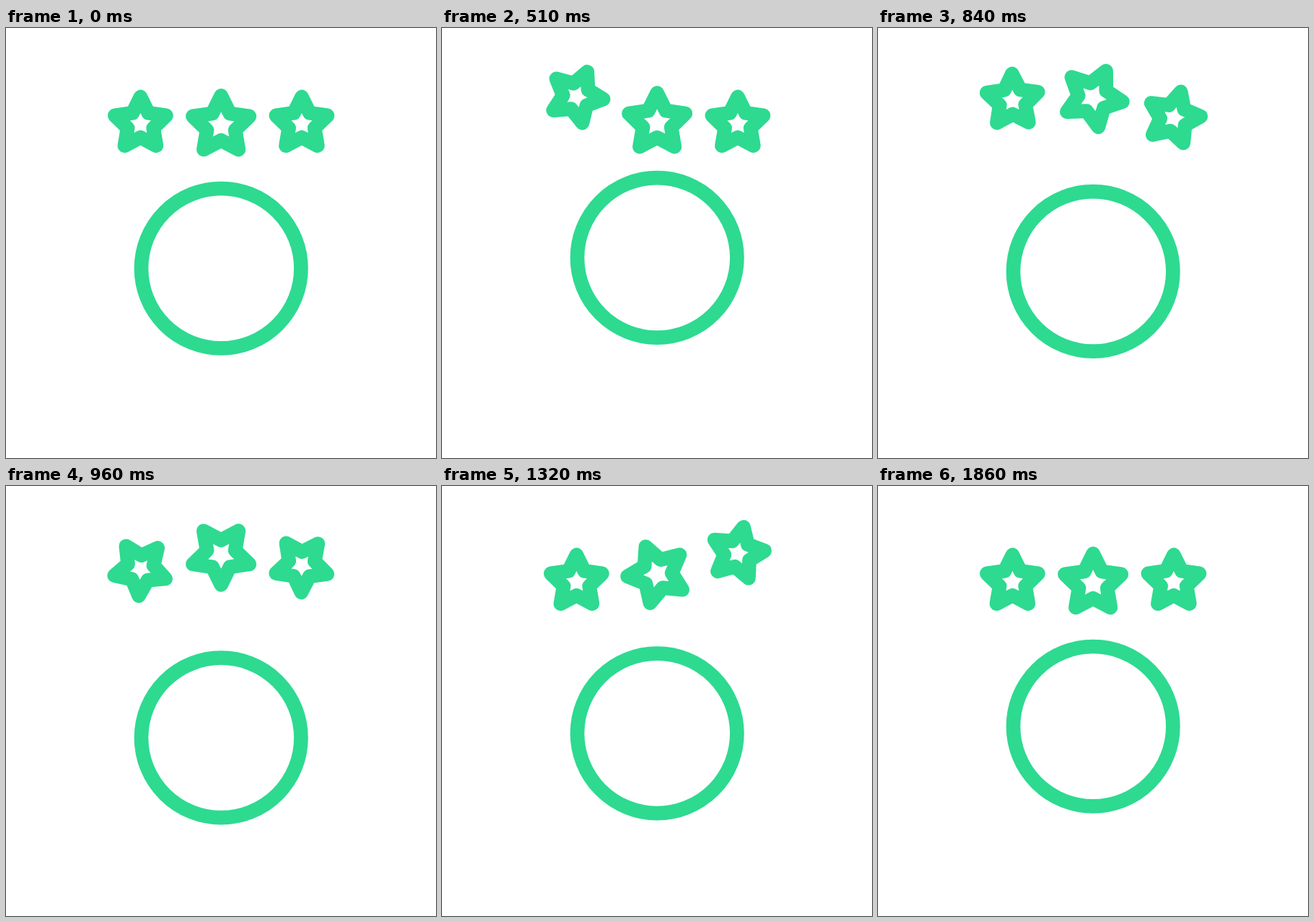
Write an HTML page with a canvas that moves like this. It is 596x596 px and loops after 1890 ms.

```html
<!DOCTYPE html>
<html lang="en">
<head>
<meta charset="utf-8">
<title>Jumping stars</title>
<style>
  html, body { margin: 0; width: 100%; height: 100%; overflow: hidden; background: #fff; }
  canvas { display: block; width: 596px; height: 596px; }
</style>
</head>
<body>
<canvas id="stage" width="596" height="596"></canvas>
<script>
const ctx = document.getElementById('stage').getContext('2d');
const STEP = 30;
const COUNT = 63;
const GREEN = '#2dda90';
const LIFT = 39.5;

// delay is counted in steps
const stars = [
  { x: 186.4, y: 132.9, r: 37.4, delay: 0 },
  { x: 298.1, y: 135.1, r: 41.2, delay: 10.6 },
  { x: 409.9, y: 132.9, r: 37.4, delay: 20 }
];

const part = (t, a, b) => Math.min(1, Math.max(0, (t - a) / (b - a)));

function smooth(t, a, b) {
  const u = part(t, a, b);
  return u * u * (3 - 2 * u);
}

const easeOut = (t, a, b, power) => 1 - Math.pow(1 - part(t, a, b), power);

function ringY(t) {
  return 333.2
    - 15.6 * smooth(t, 1, 19.5)
    + 34.9 * smooth(t, 19.5, 35.1)
    - 19.3 * smooth(t, 35.1, 52.9);
}

const rise = t => LIFT * (smooth(t, 3.4, 18.9) - smooth(t, 23.6, 39.5));

// half a turn on the way up, half on the way down
const spin = t => Math.PI * (easeOut(t, 7.5, 22, 2.5) + easeOut(t, 21.4, 41, 2.2));

function drawStar(star, t) {
  const local = t - star.delay;
  const cy = star.y - rise(local);
  const turn = spin(local);
  ctx.beginPath();
  for (let i = 0; i < 10; i++) {
    const r = i % 2 ? star.r / 2 : star.r;
    const a = turn + i * Math.PI / 5;
    ctx.lineTo(star.x + r * Math.sin(a), cy - r * Math.cos(a));
  }
  ctx.closePath();
  ctx.stroke();
}

function draw(t) {
  ctx.fillStyle = '#fff';
  ctx.fillRect(0, 0, 596, 596);
  ctx.strokeStyle = GREEN;
  ctx.lineWidth = 19.7;
  ctx.lineJoin = 'round';
  ctx.beginPath();
  ctx.arc(298.2, ringY(t), 110.7, 0, Math.PI * 2);
  ctx.stroke();
  for (const star of stars) drawStar(star, t);
}

const start = performance.now();

function tick() {
  const ms = Math.max(0, performance.now() - start);
  draw(Math.floor(ms / STEP) % COUNT);
  requestAnimationFrame(tick);
}

tick();
</script>
</body>
</html>
```
